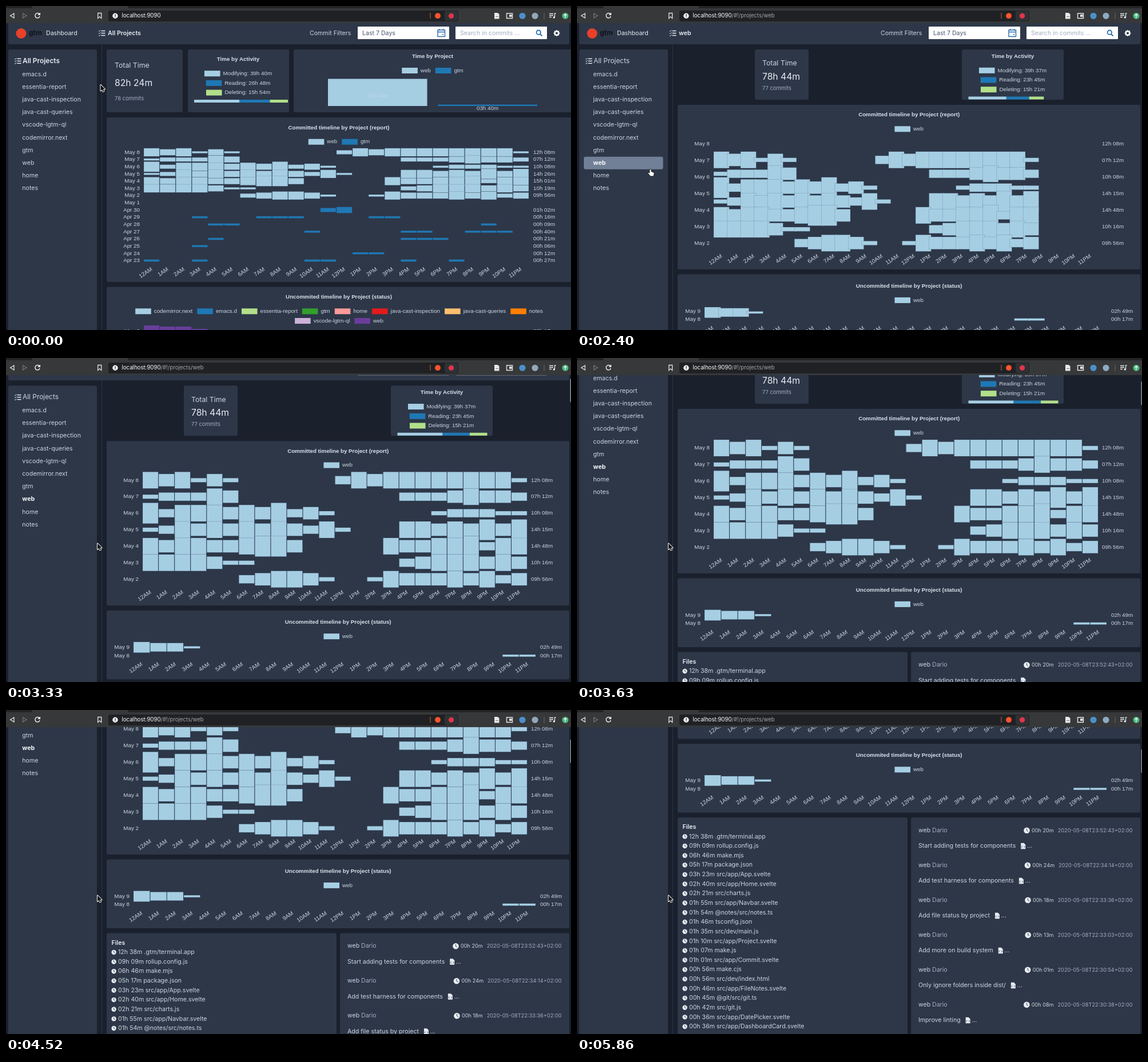
Write an HTML page with a canvas that moves like this. It is 988 px wide and 567 px high and loops after 5960 ms.

```html
<!DOCTYPE html>
<html lang="en">
<head>
<meta charset="utf-8">
<title>Project time dashboard</title>
<style>
  html, body { margin: 0; width: 100%; height: 100%; overflow: hidden; background: #1a202c; }
  canvas { display: block; width: 988px; height: 567px; }
</style>
</head>
<body>
<canvas id="stage"></canvas>
<script>
const W = 988, H = 567, LOOP = 5960;
const canvas = document.getElementById('stage');
const ctx = canvas.getContext('2d');
const ratio = window.devicePixelRatio || 1;
canvas.width = W * ratio;
canvas.height = H * ratio;

const PAGE = '#1a202c', CARD = '#2d3748', TEXT = '#cbd5e0', BRIGHT = '#e8edf4', DIM = '#a0aec0';
const [SKY, BLUE, LIME, GREEN, PINK, RED, SAND, ORANGE, LILAC, PURPLE] =
  ['#a6cee3', '#1f78b4', '#b2df8a', '#33a02c', '#fb9a99', '#e31a1c', '#fdbf6f', '#ff7f00', '#cab2d6', '#6a3d9a'];
const UI = 'Inter, sans-serif', CHART = '"Liberation Sans", Arial, sans-serif';

// The screen only refreshes at these moments (ms).
const MOMENTS = [0, 300, 450, 600, 750, 900, 1050, 1200, 1950, 2100, 2250, 2400, 2580, 2730, 2880, 3030];
const SCROLL = [
  [3330, 27.7], [3480, 62], [3630, 84], [3780, 92],
  [4080, 118.5], [4220, 160], [4370, 192], [4520, 208],
  [4820, 245], [4960, 305], [5110, 333.7],
  [5560, 360], [5710, 395], [5860, 410.6]
];
const NAVIGATE = 1950, CHART_START = 2033, CHART_TIME = 1000;

const PROJECTS = ['emacs.d', 'essentia-report', 'java-cast-inspection', 'java-cast-queries', 'vscode-lgtm-ql',
  'codemirror.next', 'gtm', 'web', 'home', 'notes'];
const ITEM_Y = 119.5, ITEM_H = 22.2;

// One digit per hour: the height level of that hour's block.
const WEB_HOURS = [
  '434131000000243444444441', '122243000000000022234332', '524443435231000000122211',
  '124343434324100044343535', '434433455300000433445244', '444431100000000023444343',
  '000000234431001433343423'
];
const GTM_HOURS = [
  '000000000002300000000000', '000100011100001100000000', '000011000000000000000100',
  '000000000010000011001110', '000010000000000011100000', '000100000000000000000000',
  '000000000000011000000000', '100100000011000010010000'
];
const ALL_TIMES = ['12h 08m', '07h 12m', '10h 08m', '14h 26m', '15h 01m', '10h 19m', '09h 56m', '',
  '01h 02m', '00h 16m', '00h 09m', '00h 40m', '00h 21m', '00h 06m', '00h 12m', '00h 27m'];
const WEB_TIMES = ['12h 08m', '07h 12m', '10h 08m', '14h 15m', '14h 48m', '10h 16m', '09h 56m'];
const allRows = ALL_TIMES.map((time, i) => ({
  label: i < 8 ? `May ${8 - i}` : `Apr ${38 - i}`, time,
  hours: i < 8 ? WEB_HOURS[i] || '' : GTM_HOURS[i - 8], color: i < 8 ? SKY : BLUE
}));
const webRows = WEB_TIMES.map((time, i) => ({ label: `May ${8 - i}`, time, hours: WEB_HOURS[i], color: SKY }));
const statusRows = [
  { label: 'May 9', time: '02h 49m', hours: '5441', color: SKY },
  { label: 'May 8', time: '00h 17m', hours: '0'.repeat(22) + '11', color: SKY }
];

const FILES = ['12h 38m .gtm/terminal.app', '09h 09m rollup.config.js', '06h 46m make.mjs', '05h 17m package.json',
  '03h 23m src/app/App.svelte', '02h 40m src/app/Home.svelte', '02h 21m src/charts.js',
  '01h 55m src/app/Navbar.svelte', '01h 54m @notes/src/notes.ts', '01h 46m tsconfig.json',
  '01h 35m src/dev/main.js', '01h 10m src/app/Project.svelte', '01h 07m make.js',
  '01h 01m src/app/Commit.svelte', '00h 56m make.cjs', '00h 56m src/dev/index.html',
  '00h 46m src/app/FileNotes.svelte', '00h 45m @git/src/git.ts', '00h 42m src/git.js',
  '00h 36m src/app/DatePicker.svelte', '00h 36m src/app/DashboardCard.svelte'];
const COMMITS = [
  ['Start adding tests for components', '00h 20m', '23:52:43'],
  ['Add test harness for components', '00h 24m', '22:34:14'],
  ['Add file status by project', '00h 18m', '22:33:36'],
  ['Add more on build system', '05h 13m', '22:33:03'],
  ['Only ignore folders inside dist/', '00h 01m', '22:30:54'],
  ['Improve linting', '00h 08m', '22:30:38']
];

const clamp = v => Math.max(0, Math.min(1, v));
const mix = (a, b, p) => a + (b - a) * p;
const easeInOut = p => p * p * (3 - 2 * p);

// ---- drawing helpers ----
function rect(x, y, w, h, color, radius = 0) {
  ctx.fillStyle = color;
  ctx.beginPath();
  ctx.roundRect(x, y, w, h, radius);
  ctx.fill();
}
const box = (x1, y1, x2, y2) => rect(x1, y1, x2 - x1, y2 - y1, CARD, 3);

function disc(x, y, r, color) {
  ctx.fillStyle = color;
  ctx.beginPath();
  ctx.arc(x, y, r, 0, 7);
  ctx.fill();
}
function stroke(path, color, width = 1.3) {
  ctx.strokeStyle = color;
  ctx.lineWidth = width;
  ctx.stroke(new Path2D(path));
}
function fill(path, color) {
  ctx.fillStyle = color;
  ctx.fill(new Path2D(path));
}
// Returns the width of the text.
function text(s, x, y, { size = 10.6, color = TEXT, weight = 400, align = 'left', font = UI } = {}) {
  ctx.font = `${weight} ${size}px ${font}`;
  ctx.fillStyle = color;
  ctx.textAlign = align;
  ctx.fillText(s, x, y);
  return ctx.measureText(s).width;
}
const label = (s, x, y, align = 'left', color = TEXT) => text(s, x, y, { size: 9.8, font: CHART, align, color });
const title = (s, x, y) => text(s, x, y, { size: 9.72, font: CHART, weight: 700, align: 'center', color: '#d8e0ea' });

function clock(x, y, r) {
  disc(x, y, r, BRIGHT);
  stroke(`M${x} ${y - r * .6}V${y}L${x + r * .45} ${y + r * .35}`, CARD, 1);
}
function listIcon(x, y) {
  for (const dy of [-4, 0, 4]) {
    stroke(`M${x} ${y + dy}l1.2 1.2l2 -2.4`, BRIGHT, 1);
    stroke(`M${x + 4.5} ${y + dy}h7`, BRIGHT, 1.5);
  }
}

// ---- charts ----
function legend(cx, y, items) {
  const swatch = 27.6, pad = 5, gap = 8;
  ctx.font = `9.8px ${CHART}`;
  const widths = items.map(([name]) => swatch + pad + ctx.measureText(name).width);
  let x = cx - (widths.reduce((a, b) => a + b) + gap * (items.length - 1)) / 2;
  items.forEach(([name, color], i) => {
    rect(x, y - 5, swatch, 10, color);
    label(name, x + swatch + pad, y);
    x += widths[i] + gap;
  });
}

// Blocks spread out from the bottom left corner as grow goes from 0 to 1.
function heatmap({ x, y, colW, rowH, unit, rows, labelX, timeX, hoursY, grow = 1 }) {
  const bottom = y + rowH * (rows.length - 1);
  rows.forEach((row, r) => {
    const rowY = y + rowH * r, cy = mix(bottom, rowY, grow);
    label(row.label, labelX, rowY, 'right');
    label(row.time, timeX, rowY);
    [...row.hours].forEach((level, c) => {
      if (level === '0') return;
      const h = level * unit, left = x + colW * c * grow;
      rect(left, cy - h / 2, colW - .9, h, row.color);
      ctx.strokeStyle = 'rgba(45,75,105,.4)';
      ctx.lineWidth = .5;
      ctx.strokeRect(left, cy - h / 2, colW - .9, h);
    });
  });
  for (let c = 0; c < 24; c++) {
    ctx.save();
    ctx.translate(x + colW * (c + .5), hoursY);
    ctx.rotate(-.59);
    label((c % 12 || 12) + (c < 12 ? 'AM' : 'PM'), 0, 0, 'right');
    ctx.restore();
  }
}

function activity(cx, top, barY, times, barX, parts, grow) {
  title('Time by Activity', cx, top);
  ['Modifying', 'Reading', 'Deleting'].forEach((name, i) =>
    legend(cx, top + 24.5 + 16.7 * i, [[`${name}: ${times[i]}`, [SKY, BLUE, LIME][i]]]));
  let x = barX;
  parts.forEach((w, i) => {
    rect(x, barY, w * grow, 5, [SKY, BLUE, LIME][i]);
    x += w * grow;
  });
}

// ---- pages ----
function navbar(page) {
  rect(4, 20, 981, 47, CARD, 3);
  disc(26.5, 48, 9, '#e8402a');
  text('gtm', 40, 47.5, { size: 12, weight: 700, color: '#0f131b' });
  text('Dashboard', 70, 47.5, { color: BRIGHT });
  listIcon(162, 47.5);
  text(page, 178, 47.5, { weight: 600, color: BRIGHT });
  text('Commit Filters', 531, 47.5);

  rect(615, 36, 160, 22, '#fff', 1);
  text('Last 7 Days', 623, 47.5, { color: '#4a5568' });
  stroke('M755 42h12.500v11.500h-12.500zM755 45.500h12.500M758 40v3M764.500 40v3M763 50h2', '#2b6cb0', 1.4);

  rect(786, 36, 160, 22, '#fff', 1);
  text('Search in commits ...', 794, 47.5, { color: DIM });
  stroke('M935 46.200a3.700 3.700 0 1 1 -7.400 0a3.700 3.700 0 1 1 7.400 0M934 49l3.500 3.500', '#2b6cb0', 1.8);

  const gear = 'M966.300 47.500a3.300 3.300 0 1 1 -6.600 0a3.300 3.300 0 1 1 6.600 0';
  stroke(gear, '#fff', 2.6);
  for (let i = 0; i < 8; i++) {
    const a = i * Math.PI / 4;
    disc(963 + 4.6 * Math.cos(a), 47.5 + 4.6 * Math.sin(a), 1, '#fff');
  }
}

function sidebar(selected, hovered) {
  rect(4, 76, 155, 1200, CARD, 3);
  rect(167, 68, 1, 1200, '#2d3748');
  listIcon(15, 96.3);
  text('All Projects', 29, 96.3, { size: 11.9, weight: selected < 0 ? 600 : 400, color: selected < 0 ? BRIGHT : TEXT });
  PROJECTS.forEach((name, i) => {
    const y = ITEM_Y + ITEM_H * i;
    if (i === hovered) rect(12, y - 11.2, 138.5, 22, '#718096', 3);
    const strong = i === selected;
    text(name, 28.3, y, { weight: strong ? 700 : 400, color: strong || i === hovered ? '#f3f6fa' : TEXT });
  });
}

function total(x, ys, time, commits) {
  text('Total Time', x, ys[0], { size: 12.3 });
  text(time, x, ys[1], { size: 15.7, color: BRIGHT });
  text(commits, x, ys[2], { size: 9.4, color: DIM });
}

function overview() {
  box(176, 76, 309, 186);
  total(190, [104.5, 135.5, 162.5], '82h 24m', '78 commits');
  box(318, 76, 495, 186);
  activity(406, 93.7, 164, ['39h 40m', '26h 48m', '15h 54m'], 329, [79, 53.5, 31.5], 1);

  box(503, 76, 992, 186);
  title('Time by Project', 746, 88.5);
  legend(746, 113, [['web', SKY], ['gtm', BLUE]]);
  rect(563, 127.5, 173.5, 47.5, SKY);
  label('78h 44m', 649.5, 157, 'center', '#bdd6e6');
  rect(755.5, 172.5, 173.5, 2.5, BLUE);
  label('03h 40m', 842, 179.5, 'center');

  box(176, 195, 992, 483);
  title('Committed timeline by Project (report)', 582, 213);
  legend(582.5, 237.7, [['web', SKY], ['gtm', BLUE]]);
  heatmap({ x: 241, y: 256, colW: 28.08, rowH: 12.63, unit: 3.55, rows: allRows, labelX: 234, timeX: 922, hoursY: 460 });

  box(176, 491.5, 992, 700);
  title('Uncommited timeline by Project (status)', 582, 509.7);
  legend(582.5, 534.3, [['codemirror.next', SKY], ['emacs.d', BLUE], ['essentia-report', LIME], ['gtm', GREEN],
    ['home', PINK], ['java-cast-inspection', RED], ['java-cast-queries', SAND], ['notes', ORANGE]]);
  legend(582.5, 551, [['vscode-lgtm-ql', LILAC], ['web', PURPLE]]);
  heatmap({ x: 241, y: 569, colW: 28.08, rowH: 20, unit: 4, labelX: 234, timeX: 922, hoursY: 620,
    rows: [{ label: 'May 9', time: '03h 17m', hours: '5442', color: PURPLE }] });
}

function webProject(grow) {
  box(311, 76, 405, 164);
  total(324, [100.7, 124.3, 143.7], '78h 44m', '77 commits');
  box(673, 76, 851, 164);
  activity(762, 88.3, 158.5, ['39h 37m', '23h 45m', '15h 21m'], 684.5, [79, 47.5, 30.5], grow);

  box(176, 173, 985, 461);
  title('Committed timeline by Project (report)', 580.7, 190.8);
  legend(580.7, 215.3, [['web', SKY]]);
  heatmap({ x: 239, y: 241.5, colW: 28.04, rowH: 28.9, unit: 7.25, rows: webRows, labelX: 232, timeX: 918,
    hoursY: 437, grow });

  box(176, 469.5, 985, 590);
  title('Uncommited timeline by Project (status)', 580.7, 490.4);
  legend(580.7, 514.9, [['web', SKY]]);
  heatmap({ x: 223, y: 534, colW: 29.33, rowH: 14.6, unit: 3.75, rows: statusRows, labelX: 216, timeX: 934,
    hoursY: 563, grow });

  rect(176, 598.5, 402, 700, CARD, 3);
  text('Files', 184.5, 615.5, { weight: 600, color: BRIGHT });
  FILES.forEach((file, i) => {
    const y = 632 + 16.63 * i;
    clock(188.6, y, 4.2);
    text(file, 196, y);
  });

  rect(584, 598.5, 401, 700, CARD, 3);
  COMMITS.forEach(([message, spent, time], i) => {
    const y = 621.3 + 61 * i;
    text('web', 597, y);
    text('Dario', 621, y, { color: DIM });
    let x = 971.5;
    x -= text(`2020-05-08T${time}+02:00`, x, y + .3, { size: 9.2, color: DIM, align: 'right' }) + 7;
    x -= text(spent, x, y + .3, { size: 9.1, align: 'right' }) + 8.5;
    clock(x, y, 5.3);

    const end = 597 + text(message, 597, y + 27.6), top = y + 22;
    fill(`M${end + 9} ${top}h5l3 3v7.500h-8z`, BRIGHT);
    stroke(`M${end + 11.5} ${top + 5}l-1.300 1.700l1.300 1.700M${end + 14.5} ${top + 5}l1.300 1.700l-1.300 1.700`, CARD, .8);
    text('...', end + 19.5, y + 27.6);
  });
}

function toolbar(path) {
  rect(0, 0, W, 30, '#37383a');
  rect(0, 0, 46, 4, '#232426');
  rect(213, 0, W - 213, 4, '#232426');
  stroke('M14 13v8l-6.500 -4z', '#f0f0f0', 1.2);
  stroke('M29.500 13v8l6.500 -4z', '#77787a', 1.2);
  stroke('M58.500 14.300a4.200 4.200 0 1 0 .600 3.700M59.300 12v3.300h-3.300', '#f0f0f0', 1.4);
  stroke('M160.700 12.500h6v9l-3 -2.700l-3 2.700z', '#e0e0e0', 1.3);

  rect(179, 8, 612, 19, '#202124', 3);
  disc(191, 17.3, 4.7, '#f0f0f0');
  rect(190.4, 14.4, 1.3, 3.4, '#202124');
  rect(190.4, 18.8, 1.3, 1.3, '#202124');
  const width = text('localhost:9090', 202.5, 17.3, { size: 9.65, color: '#fff' });
  text(path, 202.5 + width, 17.3, { size: 9.65, color: '#a5a6a9' });
  rect(741.5, 12, 1, 10, '#b0703c');
  disc(755, 17.3, 5, '#fb542b');
  rect(767, 9, 23, 17, '#303135', 3);
  disc(778.5, 17.3, 4.6, '#e0364c');

  fill('M854 12h6l2.500 2.500v8h-8.500z', '#e8e8e8');
  stroke('M856 18.500h5', '#77787a', 1);
  stroke('M875.500 13h10v8.500h-10z', '#e8e8e8', 1.4);
  rect(880, 15, 4.5, 4, '#e8e8e8');
  disc(903, 17.3, 5.6, '#4b8fca');
  disc(925, 17.3, 5.6, '#8fa9bd');
  rect(940.5, 12, 1, 11, '#68696b');
  stroke('M950 13.500h7M950 16.500h7M950 19.500h4M959.500 20v-7h2', '#e8e8e8', 1.3);
  disc(958.2, 20, 1.7, '#e8e8e8');
  disc(978, 17.3, 5.6, '#49b87c');
  stroke('M978 20.500v-6M975.500 16.700l2.500 -2.500l2.500 2.500', '#fff', 1.2);
}

function cursorAt(t) {
  if (t < NAVIGATE) {
    const p = easeInOut(clamp((t - 150) / 1050));
    return [mix(165.5, 56.5, p), mix(138, 271.5, p)];
  }
  if (t <= 2400) {
    const p = clamp((t - 1950) / 450);
    return [mix(56.5, 128.5, p), mix(271.5, 285.5, p)];
  }
  const p = clamp((t - 2400) / 480);
  return [mix(128.5, 160, p), mix(285.5, 324.5, p)];
}

function drawCursor(x, y, hand) {
  const shape = new Path2D(hand
    ? 'M-1.200 1q1.200 -1.500 2.200 0v3.500l4 1.200q1.300 .5 1 2l-.9 4.300h-5.200l-3.700 -4.600q-.4 -1.600 1.200 -1.200l1.400 1.200z'
    : 'M0 0v10.500l2.500 -2.200l1.600 3.600l1.800 -.8l-1.600 -3.500h3.300z');
  ctx.save();
  ctx.translate(x, y);
  ctx.lineJoin = 'round';
  ctx.lineWidth = hand ? 1.6 : 2;
  ctx.strokeStyle = hand ? '#111' : '#f4f4f4';
  ctx.stroke(shape);
  ctx.fillStyle = hand ? '#fff' : '#111';
  ctx.fill(shape);
  ctx.restore();
}

function draw(now) {
  const [scrollTime, scroll] = SCROLL.filter(([time]) => time <= now).pop() || [0, 0];
  const t = Math.max(scrollTime, ...MOMENTS.filter(time => time <= now));
  const onProject = t >= NAVIGATE;
  const [x, y] = cursorAt(t);
  const item = Math.floor((y - ITEM_Y + ITEM_H / 2) / ITEM_H);
  const hovered = x > 12 && x < 150 && scroll === 0 && item >= 0 && item < PROJECTS.length ? item : -1;

  ctx.setTransform(ratio, 0, 0, ratio, 0, 0);
  ctx.textBaseline = 'middle';
  rect(0, 0, W, H, PAGE);
  ctx.save();
  ctx.translate(0, -scroll);
  navbar(onProject ? 'web' : 'All Projects');
  sidebar(onProject ? PROJECTS.indexOf('web') : -1, hovered);
  if (onProject) webProject(1 - (1 - clamp((t - CHART_START) / CHART_TIME)) ** 4);
  else overview();
  ctx.restore();

  if (scroll) rect(986.5, 34 + scroll * .085, 1.5, 41, '#8b919b', 1);
  toolbar(onProject ? '/#!/projects/web' : '');
  drawCursor(x, y, hovered >= 0);
}

const start = performance.now();
function frame() {
  draw((performance.now() - start) % LOOP);
  requestAnimationFrame(frame);
}
frame();
</script>
</body>
</html>
```
